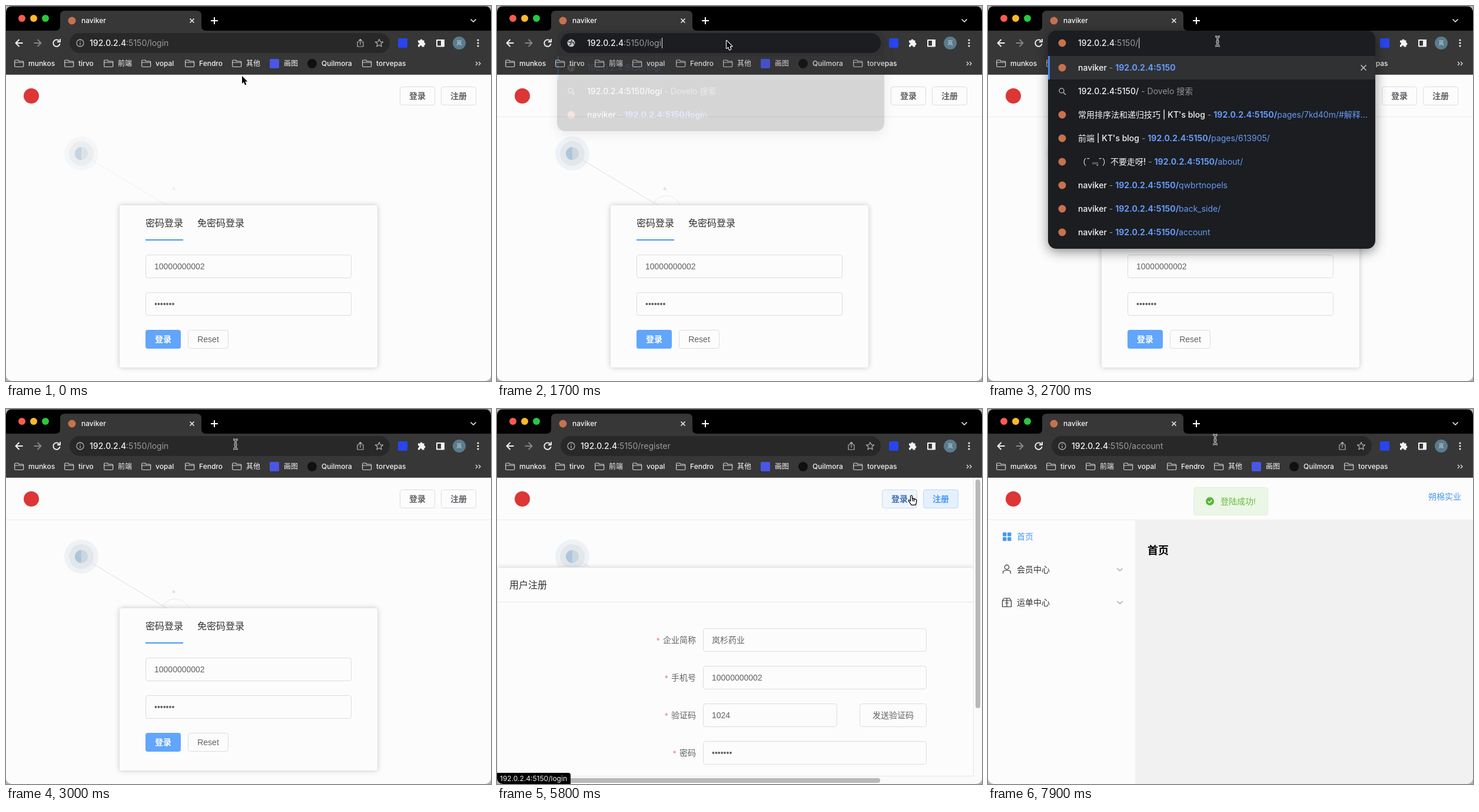
Write an HTML page with a canvas that moves like this. It is 824x638 px and loops after 8000 ms.

```html
<!DOCTYPE html>
<html lang="zh">
<head>
<meta charset="utf-8">
<style>
html, body { margin: 0; width: 824px; height: 638px; overflow: hidden; background: #b5b5b5; }
canvas { display: block; border-radius: 10px; }
</style>
</head>
<body>
<canvas id="stage" width="824" height="638"></canvas>
<script>
const stage = document.getElementById('stage').getContext('2d');
const layer = new OffscreenCanvas(824, 638).getContext('2d');
let g = stage;
const UI = 'Inter, "Noto Sans CJK SC", "Noto Sans CJK", sans-serif';
const PAGE = '"Liberation Sans", "Noto Sans CJK SC", "Noto Sans CJK", sans-serif';
const IP = '192.0.2.4', PORT = ':5150', HOST = IP + PORT, SITE = 'naviker';
const BLUE = '#4597fa', INK = '#606266', BG = '#fcfcfc', ORANGE = '#c8714e';
const LOOP = 8000;

// ---- drawing helpers ----
function box(x, y, w, h, r, fill, stroke) {
  g.beginPath();
  if (stroke) g.roundRect(x + .5, y + .5, w - 1, h - 1, r);
  else g.roundRect(x, y, w, h, r);
  if (fill) { g.fillStyle = fill; g.fill(); }
  if (stroke) { g.strokeStyle = stroke; g.lineWidth = 1; g.stroke(); }
}

// y is the middle of the line; returns the right end
function text(s, x, y, size, color, weight = 400, font = UI, align = 'left') {
  g.font = `${weight} ${size}px ${font}`;
  g.textAlign = align;
  g.fillStyle = color;
  g.fillText(s, x, y + size * .36);
  return x + g.measureText(s).width;
}

const label = (s, x, y, color = INK, weight = 400, size = 14, align) =>
  text(s, x, y, size, color, weight, PAGE, align);

function path(d, x, y, stroke, width = 1.5, fill) {
  g.save();
  g.translate(x, y);
  const p = new Path2D(d);
  if (fill) { g.fillStyle = fill; g.fill(p); }
  if (stroke) {
    g.strokeStyle = stroke;
    g.lineWidth = width;
    g.lineJoin = 'round';
    g.stroke(p);
  }
  g.restore();
}

function disc(x, y, r, fill, stroke, width = 1) {
  g.beginPath();
  g.arc(x, y, r, 0, Math.PI * 2);
  if (fill) { g.fillStyle = fill; g.fill(); }
  if (stroke) { g.strokeStyle = stroke; g.lineWidth = width; g.stroke(); }
}

function shadowed(color, blur, dy, draw) {
  g.save();
  g.shadowColor = color;
  g.shadowBlur = blur;
  g.shadowOffsetY = dy;
  draw();
  g.restore();
}

// Draws a group of shapes at one common opacity.
function faded(alpha, draw) {
  layer.clearRect(0, 0, 824, 638);
  g = layer;
  draw();
  g = stage;
  g.globalAlpha = alpha;
  g.drawImage(layer.canvas, 0, 0);
  g.globalAlpha = 1;
}

// ---- timeline ----
const mouseKeys = [
  [0, 401, 119], [200, 401, 119], [900, 391, 60], [1700, 390, 59], [2700, 390, 60], [3000, 390, 60],
  [3900, 690, 147], [4300, 690, 147], [4700, 762, 150], [5300, 762, 150], [5800, 704, 147],
  [6200, 704, 147], [6800, 261, 574], [7300, 261, 574], [7800, 386, 52], [LOOP, 386, 52]
];

function mouseAt(t) {
  const i = mouseKeys.findIndex(k => k[0] > t);
  const [t0, x0, y0] = mouseKeys[i - 1], [t1, x1, y1] = mouseKeys[i];
  const k = (t - t0) / (t1 - t0), e = k * k * (3 - 2 * k);
  return { x: x0 + (x1 - x0) * e, y: y0 + (y1 - y0) * e };
}

function stateAt(t) {
  const page = t >= 7400 ? 'account' : t >= 5000 && t < 6000 ? 'register' : 'login';
  const m = mouseAt(t);
  const over = (x, y, w, h) => m.x >= x && m.x < x + w && m.y >= y && m.y < y + h;
  const shift = page === 'register' ? 15 : 0, site = page !== 'account';
  const kept = t < 1600 ? 6 : Math.max(1, Math.min(5, 23 - Math.floor(t / 100)));
  return {
    t, page, m, shift, kept,
    focus: t >= 1000 && t < 2900,
    onLogin: site && over(669 - shift, 137, 60, 32),
    onRegister: site && over(739 - shift, 137, 60, 32),
    onSubmit: page === 'login' && over(237, 551, 60, 32),
    onUrl: over(110, 44, 480, 36) && !(t >= 1600 && t < 1900),
    popup: t >= 1600 && t < 2900 ? Math.max(0, Math.min(1, (t - 1640) / 360)) : 0
  };
}

// ---- browser ----
function lens(x, y) {
  disc(x - 1, y - 1, 4, null, '#aaa', 1.5);
  path('M2 2 l4 4', x, y, '#aaa', 1.7);
}

function globe(x, y) {
  disc(x, y, 6.5, '#c4c7ca');
  path('M-5 -2 l4 1 l1 2 l-3 3 M1 -5 l-1 3 l4 1 l1 4', x, y, '#34363a', 1.6);
}

function folder(x) {
  path('M.7 1.5 q0 -1.5 1.5 -1.5 h4 l2 2 h6 q1.5 0 1.5 1.5 v6.5 q0 1.5 -1.5 1.5 h-12 q-1.5 0 -1.5 -1.5 z M.7 4 h15', x, 92, '#d2d2d2', 1.2);
}

function bookmarks() {
  const items = [['munkos', 14], ['tirvo', 99], ['前端', 166], ['vopal', 230], ['Fendro', 304],
    ['其他', 384], ['画图', 448], ['Quilmora', 512], ['torvepas', 605]];
  for (const [name, x] of items) {
    if (x === 448) box(x, 90, 16, 16, 2, '#4957e6');
    else if (x === 512) disc(x + 8, 98, 8, '#101010');
    else folder(x);
    text(name, x + 24, 98, 12, '#f2f2f2', 500);
  }
  path('M-4 -3 l3 3 l-3 3 M1 -3 l3 3 l-3 3', 802, 98, '#ddd', 1.4);
}

function toolbarIcons() {
  path('M6.5 0 h-12 M.5 -6 l-6 6 l6 6', 22, 63, '#f4f4f4', 1.9);
  path('M-6.5 0 h12 M-.5 -6 l6 6 l-6 6', 54, 63, '#858585', 1.9);
  path('M4.3 -3.6 A5.7 5.7 0 1 0 5.6 1 M6 -7 v5 h-5', 86, 63, '#f4f4f4', 1.9);
  box(666, 55, 16, 16, 2, '#2845ee');
  path('M-6 -4 h3.5 a2 2 0 1 1 4 0 h3 v4 a2 2 0 1 1 0 4 v3 h-4 a1.8 1.8 0 1 0 -3.5 0 h-3 v-3.5 a2 2 0 1 0 0 -4 z', 706, 62.5, null, 0, '#f4f4f4');
  path('M-6 -5 h12 v10.5 h-12 z', 738, 63, '#f4f4f4', 2);
  box(739, 57, 6, 12, 0, '#f4f4f4');
  disc(770, 63, 11, '#5b7c8d');
  text('岚', 770, 63, 9, '#d6e1e6', 400, UI, 'center');
  for (const dy of [-5, 0, 5]) disc(802, 63 + dy, 1.6, '#f4f4f4');
}

function browser() {
  box(0, 0, 824, 42, 0, '#000');
  box(0, 0, 824, 1, 0, '#666');
  ['#ff5b53', '#fdb82c', '#28c840'].forEach((c, i) => disc(27 + 20 * i, 21, 6, c));
  path('M84 42 Q92 42 92 34 V16 Q92 8 100 8 H324 Q332 8 332 16 V34 Q332 42 340 42 Z', 0, 0, null, 0, '#373737');
  disc(112, 25, 6.5, ORANGE);
  text(SITE, 128, 25, 12, '#f4f4f4', 500);
  path('M-3.5 -3.5 l7 7 M3.5 -3.5 l-7 7', 316, 25, '#eee', 1.6);
  path('M-6 0 h12 M0 -6 v12', 354, 25, '#fff', 2);
  path('M-4.5 -2 l4.5 4.5 l4.5 -4.5', 794, 24.5, '#eee', 1.6);
  box(0, 42, 824, 75, 0, '#373737');
  box(0, 116, 824, 1, 0, '#4d4d4d');
  toolbarIcons();
  bookmarks();
}

function address(s) {
  const x = s.focus ? 153 : 142;
  const tail = s.focus ? '/login'.slice(0, s.kept) : '/' + s.page;
  const end = text(PORT + tail, text(IP, x, 63, 14, '#f2f2f2', 500), 63, 14, '#9b9b9b');
  if (s.focus) {
    if (s.kept === 1) disc(126, 63, 6.5, ORANGE); else globe(126, 63);
    box(end + 1, 54, 1, 18, 0, '#e6e6e6');
    return;
  }
  disc(126, 63, 6, null, '#b0b0b0', 1.3);
  path('M0 -3.5 v1.5 M0 -.5 v4', 126, 63, '#b0b0b0', 1.4);
  path('M-2 -2 h-3 v8 h10 v-8 h-3 M0 3 v-9 M-3 -3.5 l3 -3 l3 3', 602, 63, '#b5b5b5', 1.2);
  path('M0 -6.5 l1.9 4.3 l4.7 .4 l-3.6 3.1 l1.1 4.6 l-4.1 -2.5 l-4.1 2.5 l1.1 -4.6 l-3.6 -3.1 l4.7 -.4 z', 634, 63, '#b5b5b5', 1.2);
}

function suggestions(s) {
  const typed = HOST + '/login'.slice(0, s.kept);
  const search = ['?', typed];
  const rows = s.kept > 1 ? [['', typed], search, [SITE, '/login']] : [
    [SITE, ''], search,
    ["常用排序法和递归技巧 | KT's blog", '/pages/7kd40m/#解释...'],
    ["前端 | KT's blog", '/pages/613905/'],
    ['（¯﹃¯）不要走呀!', '/about/'],
    [SITE, '/qwbrtnopels'], [SITE, '/back_side/'], [SITE, '/account']
  ];
  const WHITE = '#f4f4f4', GREY = '#929497', LINK = '#6699f7';
  shadowed('rgba(0,0,0,.45)', 20, 5, () => box(102, 42, 556, 51 + rows.length * 40, 14, '#1b1d20'));
  box(102, 85, 556, 40, 0, '#303133');
  box(102, 85, 3, 40, 0, '#4285f4');
  rows.forEach(([title, tail], i) => {
    const y = 105 + i * 40;
    if (title === '?') {
      lens(126, y);
      text(' - Dovelo 搜索', text(tail, 153, y, 14, WHITE, 500), y, 14, GREY);
    } else if (!title) {
      globe(126, y);
      text(tail, 153, y, 14, LINK);
    } else {
      disc(126, y, 6.5, ORANGE);
      const full = HOST + tail;
      let x = text(title, 153, y, 14, WHITE, 500);
      x = text(' - ', x, y, 14, GREY);
      x = text(full.slice(0, typed.length), x, y, 14, LINK, 700);
      text(full.slice(typed.length), x, y, 14, LINK);
    }
  });
  if (s.kept === 1) path('M-4.5 -4.5 l9 9 M4.5 -4.5 l-9 9', 638, 105, '#c4c4c4', 1.5);
}

// ---- pages ----
function button(s, x, y, w, fill, stroke, color, weight = 700) {
  box(x, y, w, 32, 4, fill, stroke);
  label(s, x + w / 2, y + 16, color, weight, 14, 'center');
}

function field(s, x, y, w) {
  box(x, y, w, 40, 4, BG, '#dadce0');
  label(s, x + 15, y + 20);
}

function scenery(t) {
  const early = t < 200;
  g.globalAlpha = early ? .5 : 1;
  disc(128, 251, 29, '#eef2f6');
  disc(128, 251, 21, '#e2e7ec');
  disc(128, 251, 11, '#ccd6de');
  g.beginPath();
  g.arc(128, 251, 11, Math.PI / 2, Math.PI * 1.5);
  g.fillStyle = '#adc6db';
  g.fill();
  path('M138 257.5 L290 349', 0, 0, '#dedfe0', 1);
  disc(285, 311, 2.5, '#e0e3e6');
  if (!early) disc(287.5, 347.4, 24.4, null, '#e9eaeb');
  g.globalAlpha = 1;
}

function header(s) {
  if (s.t >= 200) box(0, 188, 824, 1, 0, '#ececec');
  disc(43, 153, 13, '#dc3636');
  if (s.page === 'account') return label('朔棉实业', 748, 149, BLUE);
  const plain = [BG, '#dadce0', INK], lit = ['#e5f0fd', '#b9d7fb', BLUE];
  const reg = s.page === 'register';
  const warm = reg ? ['#eff5fc', '#c3dbf8', '#3c6fb8'] : lit;
  const loginFocus = s.t >= 6000 || s.onLogin;
  button('登录', 669 - s.shift, 137, 60, ...(loginFocus ? warm : plain));
  button('注册', 739 - s.shift, 137, 60, ...(reg || s.onRegister ? lit : plain));
}

function loginPage(s) {
  scenery(s.t);
  shadowed('rgba(0,0,0,.22)', 10, 0, () => box(193, 339, 438, 276, 4, BG));
  label('密码登录', 237, 369, '#303133', 500, 16);
  label('免密码登录', 325, 369, '#303133', 400, 16);
  box(237, 397, 64, 2, 0, BLUE);
  field('10000000002', 237, 423, 350);
  field('•••••••', 237, 487, 350);
  button('登录', 237, 551, 60, s.onSubmit ? '#8abdfb' : '#61a5fc', null, '#fff');
  button('Reset', 309, 551, 69, BG, '#dadce0', INK, 400);
}

function registerPage(s) {
  scenery(s.t);
  shadowed('rgba(0,0,0,.15)', 8, 0, () => box(0, 269, 810, 400, 4, BG));
  box(0, 269, 810, 400, 4, BG, '#e4e5e8');
  box(0, 328, 809, 1, 0, '#e6e7ea');
  label('用户注册', 21, 299, '#303133', 400, 16);
  const rows = [['企业简称', '岚杉药业', 380], ['手机号', '10000000002', 380], ['验证码', '1024', 228], ['密码', '•••••••', 380]];
  rows.forEach(([name, value, w], i) => {
    const y = 373 + i * 64;
    label(name, 338, y + 20, INK, 400, 14, 'right');
    label('*', 338 - name.length * 14 - 11, y + 21, '#f56c6c');
    field(value, 350, y, w);
  });
  box(616, 501, 114, 40, 4, BG, '#dadce0');
  label('发送验证码', 673, 521, INK, 500, 14, 'center');
  box(0, 624, 824, 14, 0, '#fafafa');
  box(0, 624, 810, 1, 0, '#e6e6e6');
  box(810, 117, 14, 521, 0, '#fafafa');
  box(809, 117, 1, 508, 0, '#e6e6e6');
  box(813, 120, 8, 389, 4, '#b9b9b9');
  box(3, 628, 648, 8, 4, '#b9b9b9');
}

function accountPage() {
  box(250, 188, 574, 450, 0, '#f1f1f1');
  label('首页', 271, 241, '#000', 700, 18);
  for (const x of [25, 33]) for (const y of [210, 218]) box(x, y, 6.5, 6.5, 1, BLUE);
  label('首页', 49, 217, BLUE);
  disc(32, 269, 3.7, null, '#303133', 1.2);
  path('M-6.5 7 v-1.5 q0 -4 4 -4 h5 q4 0 4 4 v1.5', 32, 273, '#303133', 1.2);
  path('M-7.5 -3 h15 v10.5 h-15 z M-7.5 -3 l3 -4 h9 l3 4 M0 -7 v14 M-3 1 h6', 32, 329, '#303133', 1.2);
  [['会员中心', 273], ['运单中心', 329]].forEach(([name, y]) => {
    label(name, 49, y, '#303133');
    path('M-4.5 -2 l4.5 4.5 l4.5 -4.5', 224, y, '#55585c', 1);
  });
}

function toast(t) {
  const k = Math.min(1, (t - 7400) / 400);
  g.save();
  g.globalAlpha = k;
  g.translate(0, -48 * (1 - k) ** 2);
  box(349, 133, 127, 48, 4, '#ebf6e6', '#dff0d8');
  disc(377, 157, 7, '#55b837');
  path('M-3.3 0 l2.5 2.5 l4.2 -4.5', 377, 157, '#fff', 1.5);
  label('登陆成功!', 395, 157, '#62bd3c');
  g.restore();
}

function status(s) {
  const target = s.onRegister ? '/register' : s.onLogin || (s.t >= 6000 && s.t < 6600) ? '/login' : '';
  if (!target) return;
  g.font = `400 12px ${UI}`;
  const w = Math.round(g.measureText(HOST + target).width) + 11;
  box(0, 619, w, 19, [0, 4, 0, 0], '#000');
  text(HOST + target, 5, 629, 12, '#f4f4f4');
}

function cursor(s) {
  const { x, y } = s.m;
  if (s.onUrl) {
    const d = 'M-4 -8 q4 0 4 2 V6 q0 2 -4 2 M4 -8 q-4 0 -4 2 M0 6 q0 2 4 2 M-2.5 1 h5';
    path(d, x, y, '#fff', 3);
    path(d, x, y, '#111', 1.1);
  } else if (s.onLogin || s.onRegister || s.onSubmit) {
    path('M-1.5 1 q1.5 -2 3 0 v5 l1 -1 q1.5 -.5 2 1 q1.5 -.7 2.2 .8 q1.6 -.4 2 1 v4 l-1.5 4.5 h-7 l-4 -5.5 q-2 -2.5 -.6 -3 q1 -.3 2.9 2 z M2 6 v4 M4.5 6.5 v4', x, y, '#000', 1.2, '#fff');
  } else {
    const d = 'M0 0 V13 L3 10.3 L5 15.5 L7.3 14.5 L5.3 9.6 H9.3 Z';
    path(d, x, y, '#fff', 2.2);
    path(d, x, y, null, 0, '#000');
  }
}

const pages = { login: loginPage, register: registerPage, account: accountPage };

function draw(t) {
  const s = stateAt(t);
  box(0, 0, 824, 638, 0, BG);
  header(s);
  pages[s.page](s);
  if (s.page === 'account') toast(t);
  status(s);
  browser();
  box(108, 46, 544, 34, 17, s.focus ? '#1b1d20' : '#282828');
  if (s.popup) faded(s.popup, () => suggestions(s));
  address(s);
  cursor(s);
}

// The picture advances in steps of 100 ms.
const start = performance.now();
function tick() {
  const t = (performance.now() - start) % LOOP;
  draw(Math.floor(t / 100) * 100);
  requestAnimationFrame(tick);
}
tick();
</script>
</body>
</html>
```
